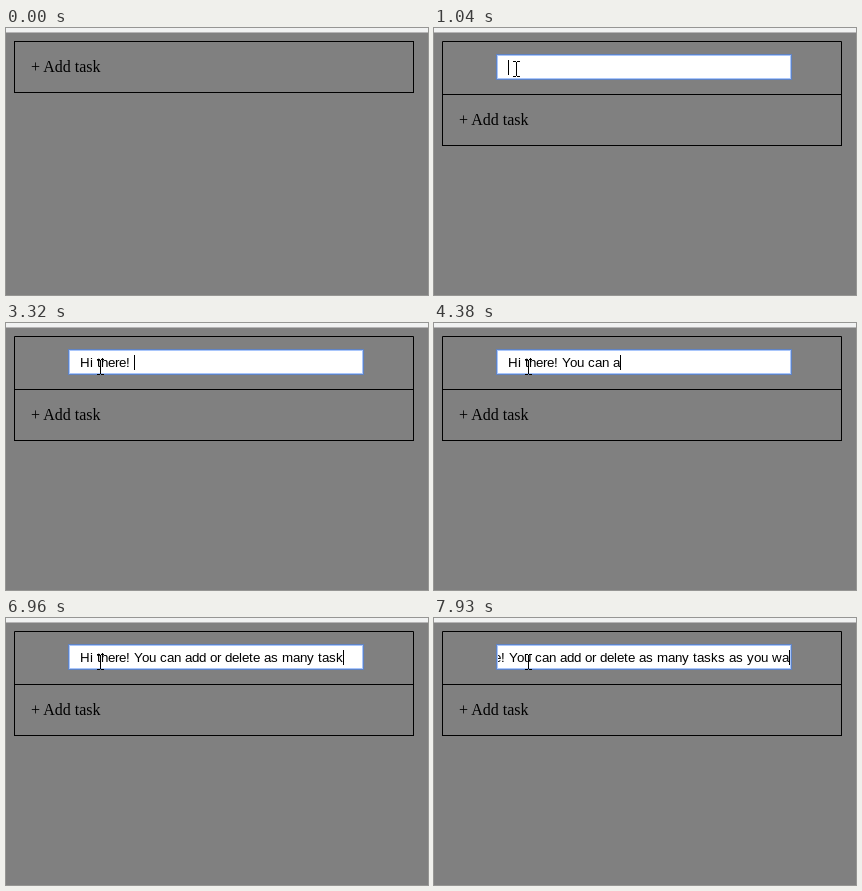
An HTML page that plays this animation: 422 px wide and 267 px high, repeating every 8000 ms.

```html
<!DOCTYPE html>
<html lang="en">
<head>
<meta charset="utf-8">
<title>Add task</title>
<style>
  html, body { margin: 0; width: 100%; height: 100%; overflow: hidden; background: #808080; }
  svg { display: block; }
  .label { font: 16px "Liberation Serif", "Times New Roman", serif; }
  #typed { font: 13.333px "Liberation Sans", Arial, sans-serif; white-space: pre; }
  .line { fill: none; stroke: #000; }
</style>
</head>
<body>
<svg width="422" height="267" viewBox="0 0 422 267">
  <defs>
    <clipPath id="inner"><rect x="64" y="28" width="292" height="22"/></clipPath>
  </defs>
  <rect width="422" height="267" fill="#808080"/>
  <rect width="422" height="4" fill="#f1f2f2"/>
  <rect y="4" width="422" height="1" fill="#b6b5b6"/>

  <g id="item">
    <path class="line" d="M8.5 67V13.5H407.5V67"/>
    <rect x="62.5" y="26.5" width="295" height="25" fill="#fff" stroke="#5f83c4"/>
    <rect x="63.5" y="27.5" width="293" height="23" fill="none" stroke="#a9c6fb"/>
    <g clip-path="url(#inner)">
      <g id="scroll">
        <text id="typed" y="44"></text>
        <rect id="caret" y="32" width="1" height="15"/>
      </g>
    </g>
  </g>

  <g id="adder">
    <rect class="line" x="8.5" y="13.5" width="399" height="51"/>
    <text class="label" x="25" y="44">+ Add task</text>
  </g>

  <path id="arrow" d="M.5 .5V16.5L4.2 13L6.6 18.5L9 17.5L6.6 12H11.5Z" fill="#fff" stroke="#000"/>
  <path id="hand" d="M-1.5 12V1.5Q0-.5 1.5 1.5V7.5Q3.5 5.5 4.5 8Q6.5 6.5 7.5 8.5Q10 7.5 10.5 10V15L8.5 18V20.5H-1.5V18L-6.5 11.5Q-6-.0-6 10Q-4.5 8.5-1.5 12Z" fill="#fff" stroke="#000"/>
  <path id="beam" d="M-3 0H0V1H1V0H4V1H1V15H4V16H1V15H0V16H-3V15H0V1H-3Z"/>
</svg>
<script>
  const LOOP = 8000;
  const PHRASE = 'Hi there! You can add or delete as many tasks as you wa';
  const LEFT = 74, RIGHT = 355;

  // first key time, last key time, steps, letters shown at the end
  const BURSTS = [
    [2180, 3010, 7, 9], [3320, 3320, 1, 10], [3590, 4380, 7, 19],
    [4520, 4520, 1, 21], [4640, 5560, 8, 31], [5720, 5850, 2, 33],
    [5990, 6680, 6, 42], [6960, 6960, 1, 44], [7090, 7930, 7, 55]
  ];
  // time, pointer shape, x, y
  const POINTER = [
    [0, '', 0, 0], [300, 'arrow', 134, 181], [450, 'arrow', 118, 132],
    [600, 'arrow', 96, 78], [750, 'hand', 82, 41],
    [1040, 'beam', 82, 33], [1170, 'beam', 94, 36]
  ];

  const $ = id => document.getElementById(id);
  const show = (id, on) => $(id).setAttribute('visibility', on ? 'visible' : 'hidden');
  const move = (id, x, y) => $(id).setAttribute('transform', `translate(${x} ${y})`);

  // Letters sit on whole pixels, with rounded advances and kerning.
  const pen = document.createElement('canvas').getContext('2d');
  pen.font = '13.333px "Liberation Sans", Arial, sans-serif';
  const width = s => pen.measureText(s).width;
  const stops = [LEFT];
  [...PHRASE].forEach((a, i) => {
    const b = PHRASE[i + 1] || '';
    const kern = b ? Math.round(width(a + b) - width(a) - width(b)) : 0;
    stops.push(stops[i] + Math.round(width(a)) + kern);
  });
  $('typed').setAttribute('x', stops.slice(0, -1).join(' '));

  function lettersAt(t) {
    let count = 0;
    for (const [start, end, steps, total] of BURSTS) {
      if (t < start) break;
      const gap = steps > 1 ? (end - start) / (steps - 1) : 1;
      const done = Math.min(steps, Math.floor((t - start) / gap + 1.001));
      count = Math.round(count + (total - count) * done / steps);
    }
    return count;
  }

  function draw(t) {
    const open = t >= 1040;
    show('item', open);
    move('adder', 0, open ? 53 : 0);

    const n = lettersAt(t);
    const text = PHRASE.slice(0, n);
    if ($('typed').textContent !== text) $('typed').textContent = text;
    $('caret').setAttribute('x', stops[n]);
    $('caret').setAttribute('opacity', t >= 1610 && t < 2040 ? 0 : 1);
    move('scroll', Math.min(0, RIGHT - stops[n]), 0);

    const [, shape, x, y] = POINTER.filter(p => p[0] <= t).pop();
    for (const id of ['arrow', 'hand', 'beam']) show(id, id === shape);
    if (shape) move(shape, x, y);
  }

  const begin = performance.now();
  function tick() {
    draw((performance.now() - begin) % LOOP);
    requestAnimationFrame(tick);
  }
  tick();
</script>
</body>
</html>
```
